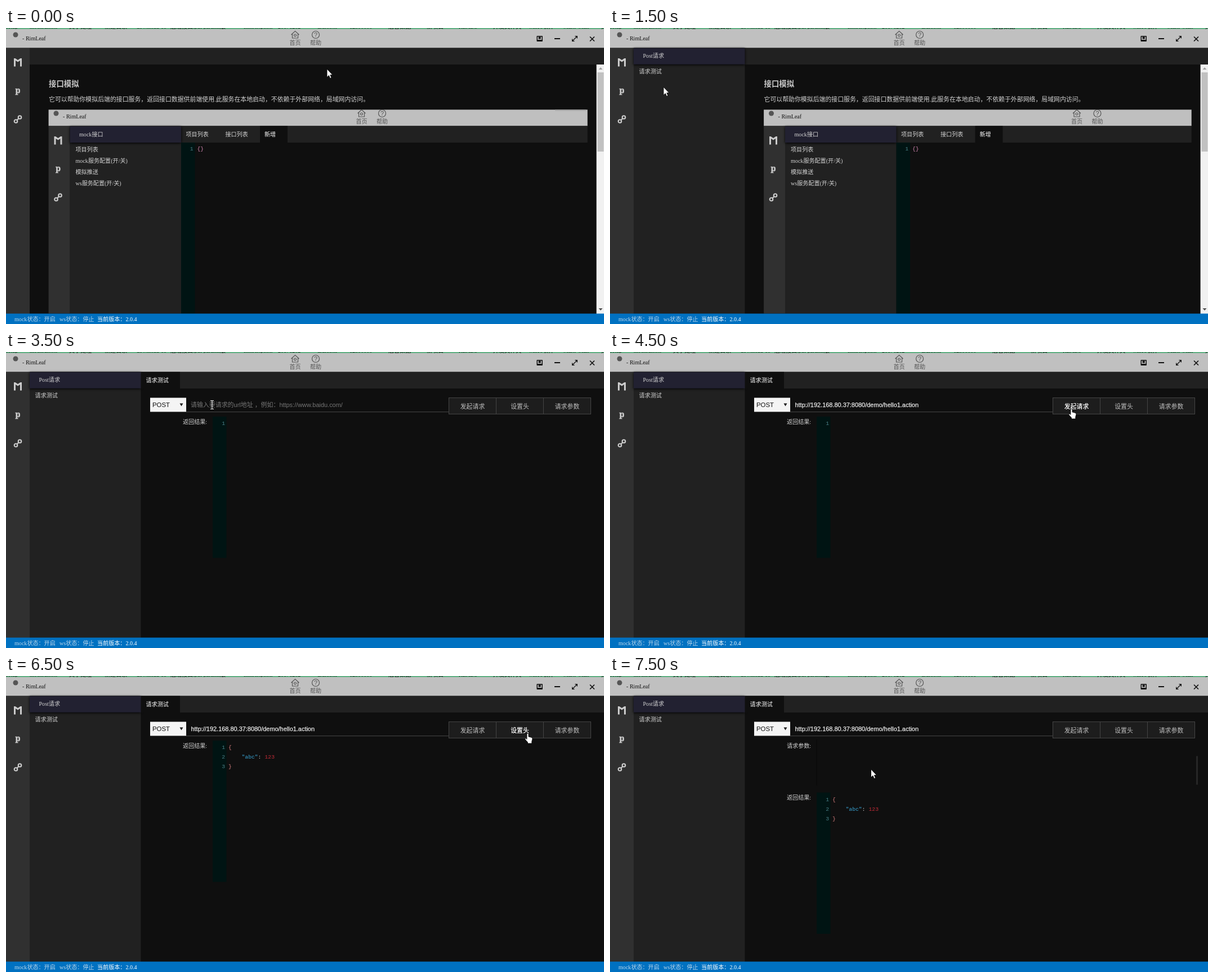
These frames come from a looping animation (1062 px wide and 527 px high, 8000 ms). An HTML page:

```html
<!DOCTYPE html>
<html lang="zh">
<head>
<meta charset="utf-8">
<title>接口请求演示</title>
<style>
  html, body { margin: 0; width: 100%; height: 100%; overflow: hidden; background: #0f0f0f; }
  svg { display: block; width: 100%; height: 100%; }
  text { font: 10.08px "Liberation Serif", "Noto Sans CJK SC", serif; fill: #d2d2d2; }
  .sans { font: 10.95px "Liberation Sans", "Noto Sans CJK SC", sans-serif; }
  .mono { font: 9.7px "Liberation Mono", monospace; }
  .para { font-size: 10.9px; }
  .title { font-size: 13.4px; font-weight: bold; fill: #c8c8c8; }
  .slab { font: 900 14px "Noto Serif", serif; fill: #ccc; stroke: #ccc; stroke-width: .5px; text-anchor: middle; }
  .dark, .desk { fill: #111; }
  .nav { fill: #555; }
  .num { fill: #4a8088; text-anchor: end; }
  .brace { fill: #d98080; }
  .key { fill: #38a5d6; }
  .val { fill: #c42c38; }
  .hint { fill: #757575; }
  .url { fill: #eee; stroke: #eee; stroke-width: .25px; }
  .btn { font-size: 10.9px; text-anchor: middle; fill: #c0c0c0; }
  .head { filter: drop-shadow(0 1px 2px #000); }
  .on { fill: #fff; }
</style>
</head>
<body>
<svg id="stage" viewBox="0 0 1062 527"></svg>
<script>
const rect = (x, y, w, h, fill, more = '') =>
  `<rect x="${x}" y="${y}" width="${w}" height="${h}" fill="${fill}" ${more}/>`;
const text = (x, y, s, cls = '', more = '') =>
  `<text x="${x}" y="${y}" class="${cls}" ${more}>${s}</text>`;
const line = (d, color, width = 1.2) =>
  `<path d="${d}" fill="none" stroke="${color}" stroke-width="${width}"/>`;
const group = (x, y, body, more = '') =>
  `<g transform="translate(${x} ${y})" ${more}>${body}</g>`;
const scene = (from, to, body) => `<g data-from="${from}" data-to="${to}">${body}</g>`;

const brand = '- RimLeaf';

const sideIcons = (x, y) => group(x, y,
  '<path d="M-7-7H-4.5L0-4L4.5-7H7V7.5H4V-3L0-.5L-4-3V7.5H-7Z" fill="#ccc"/>' +
  text(0, 55, 'p', 'slab') +
  line('M-2 103.5L2 99.5M-6.3 105a2.8 2.8 0 1 0 5.6 0a2.8 2.8 0 1 0-5.6 0M.7 98a2.8 2.8 0 1 0 5.6 0a2.8 2.8 0 1 0-5.6 0', '#ccc', 2.1));

const navIcons = (x, y) => group(x, y,
  line('M-7 0L0-6.5L7 0M-5-1.5V6H5V-1.5M-2 1a2 2 0 1 0 4 0a2 2 0 1 0-4 0', '#555') +
  text(0, 18, '首页', 'nav', 'text-anchor="middle"') +
  '<circle cx="36.5" r="6.5" fill="none" stroke="#555" stroke-width="1.2"/>' +
  text(36.5, 3.5, '?', 'sans nav', 'text-anchor="middle"') +
  text(36.5, 18, '帮助', 'nav', 'text-anchor="middle"'));

const logo = (x, y) => `<circle cx="${x}" cy="${y}" r="4.5" fill="#555"/>`;
const menuHead = (x, y, h, label) =>
  rect(x, y, 197.5, h, '#222131', 'class="head"') + text(x + 16.5, y + 17.5, label);

function desktopStrip() {
  const labels = [[0, 'setup'], [42, 'mockrun.txt'], [112, '文字处理'], [175, '新建目录'],
    [232, 'download-19'], [292, '后端接口.pdf params版'], [422, 'InitScript.txt'], [483, '20171202'],
    [553, 'draft.exe'], [610, '12300000'], [679, '后台数据'], [747, '新项目'], [804, 'READS'],
    [865, '开发文件夹'], [928, 'win10软件'], [990, 'Mark_Man'], [1057, '文']];
  return rect(0, 0, 1062, 3, '#62b184') + labels.map(([x, s]) => text(x, 1, s, 'desk')).join('');
}

function titleBar() {
  return rect(0, 2, 1062, 33.5, '#c0c0c0') + logo(17, 12) + text(29, 22, brand, 'dark') +
    navIcons(513.5, 12) +
    rect(942.5, 14, 10.5, 10, '#111', 'rx="1"') + rect(944, 15.5, 7.5, 5.5, '#c0c0c0') +
    rect(945.7, 15.5, 4, 4, '#111') +
    line('M974 19H984', '#111', 2) +
    line('M1006 23L1014 15M1010.5 14.7H1014.3V18.5M1005.7 19.5V23.3H1009.5', '#111', 1.3) +
    line('M1037 15.5L1045 23.5M1045 15.5L1037 23.5', '#111', 1.7);
}

function statusBar() {
  return rect(0, 508.5, 1062, 19, '#0071c1') +
    text(15, 522, 'mock状态：开启', '', 'style="fill:#bcd6ea"') +
    text(95, 522, 'ws状态：停止', '', 'style="fill:#bcd6ea"') +
    text(162, 522, '当前版本：2.0.4', 'on');
}

// Help page with its picture of the app; the picture is cut at the right margin.
function helpPage(shift) {
  const items = ['项目列表', 'mock服务配置(开/关)', '模拟推送', 'ws服务配置(开/关)'];
  const picture = rect(75.6, 145.4, 958, 364, '#0f0f0f') + rect(75.6, 145.4, 958, 29, '#bfbfbf') +
    rect(975, 145.4, 55, 2, '#a4a4a4') +
    logo(89, 152) + text(101, 161, brand, 'dark') + navIcons(631.5, 152) +
    rect(75.6, 174.4, 38, 334, '#303030') + sideIcons(92.5, 200) +
    rect(113.5, 174.4, 920, 29.6, '#212121') + rect(451, 174.4, 49, 30, '#0f0f0f') +
    rect(113.5, 204, 197.5, 305, '#212121') + menuHead(113.5, 175, 29, 'mock接口') +
    items.map((s, i) => text(123.5, 219.5 + i * 20.2, s)).join('') +
    text(319.5, 192.5, '项目列表') + text(389.5, 192.5, '接口列表') + text(459, 192.5, '新增', 'on') +
    rect(311, 204, 24.5, 305, '#001413') +
    text(332.5, 218, 1, 'mono num') + text(339.5, 218, '{}', 'mono', 'style="fill:#d68ab4"');
  return group(shift, 0, text(76, 104, '接口模拟', 'title') +
      text(76, 131, '它可以帮助你模拟后端的接口服务，返回接口数据供前端使用.此服务在本地启动，不依赖于外部网络，局域网内访问。', 'para')) +
    `<g clip-path="url(#margin)">${group(shift, 0, picture)}</g>` +
    rect(1048.6, 65, 14, 444, '#f1f1f1') + rect(1050.5, 79, 11, 141, '#c1c1c1') +
    '<path d="M1052.5 74h7l-3.5-4z" fill="#a3a3a3"/><path d="M1052.5 499h7l-3.5 4z" fill="#505050"/>';
}

function resultPanel(y, filled) {
  const body = rect(367, 115, 24.5, 251.5, '#001413') + text(314, 127.5, '返回结果:') +
    text(389, 130, 1, 'mono num');
  const json = text(389, 147, 2, 'mono num') + text(389, 164, 3, 'mono num') +
    text(395, 130, '{', 'mono brace') + text(418.5, 147, '"abc"', 'mono key') +
    text(447.6, 147, ':', 'mono') + text(459.5, 147, '123', 'mono val') + text(395, 164, '}', 'mono brace');
  return group(0, y, body + (filled ? json : ''));
}

function requestPage() {
  const buttons = [['发起请求', 4500, 6500], ['设置头', 6500, 7000], ['请求参数', 7000, 7500]];
  return rect(240, 35.5, 69, 30, '#0f0f0f') + text(248.5, 53.5, '请求测试', 'on') +
    rect(256, 81.5, 64, 25, '#f4f4f4') + text(260, 98, 'POST', 'sans dark', 'style="font-size:11.4px"') +
    '<path d="M308.5 91.5h6l-3 5z" fill="#111"/>' +
    rect(320, 106.2, 466, 1, '#484848') +
    scene(2000, 4000, text(328, 97.5, '请输入要请求的url地址 ，例如：https://www.baidu.com/', 'sans hint')) +
    scene(3000, 3500, rect(328, 86, 1, 16, '#ddd')) +
    scene(4000, 8000, text(328.5, 97.5, 'http://192.168.80.37:8080/demo/hello1.action', 'sans url')) +
    buttons.map(([s, from, to], i) =>
      rect(786.5 + i * 84, 81.5, 84, 29, '#1d1d1d', 'stroke="#444"') +
      text(828.5 + i * 84, 101, s, 'btn') +
      scene(from, to, text(828.5 + i * 84, 101, s, 'btn on'))).join('') +
    scene(2000, 5500, resultPanel(0, false)) + scene(5500, 7500, resultPanel(0, true)) +
    scene(7500, 8000, text(314, 127.5, '请求参数:') + rect(366.5, 113, 1, 82, '#090909') +
      rect(1041, 142.5, 3, 51, '#262626') + resultPanel(92.5, true));
}

const stage = document.getElementById('stage');
stage.innerHTML = '<clipPath id="margin"><path d="M0 145H1032.7V508.5H0z"/></clipPath>' +
  rect(0, 0, 1062, 527, '#0f0f0f') + desktopStrip() + titleBar() +
  rect(0, 35.5, 42, 474, '#303030') + rect(42, 35.5, 1020, 29.5, '#212121') + sideIcons(21, 61) +
  scene(0, 1500, helpPage(0)) + scene(1500, 2000, helpPage(197.5)) +
  scene(1500, 8000, rect(42, 35.5, 197.5, 474, '#212121') + menuHead(42, 35.7, 29, 'Post请求') +
    text(51.5, 80.5, '请求测试')) +
  scene(2000, 8000, requestPage()) +
  scene(2000, 2500, text(51.5, 80.5, '请求测试', 'on')) +
  statusBar() + '<path id="cursor" fill="#fff" stroke="#000" stroke-width=".8"/>';

const shapes = {
  arrow: 'M0 0V14.5L3.4 11.5L5.6 16.6L8 15.6L5.8 10.6H10Z',
  hand: 'M4 2Q5.5-.2 7 2V7L12 8.3Q14 9 14 11L12.8 15.5V19H5.5V17L1 12Q0 9.6 2.3 10L4 11.6Z',
  beam: 'M0 0H2.5L3 .5L3.5 0H6V1H3.5V15H6V16H0V15H2.5V1H0Z'
};
// One pointer pose per half second.
const poses = [
  ['arrow', 570, 73], ['arrow', 113, 96], ['hand', 18, 117], ['arrow', 95, 105],
  ['hand', 81, 79], ['beam', 348, 86], ['beam', 355, 86], ['beam', 363, 86],
  ['beam', 394, 86], ['hand', 814, 100], ['hand', 819, 100], ['hand', 820, 101],
  ['hand', 813, 104], ['hand', 921, 101], ['hand', 990, 101], ['arrow', 463.5, 166]
];

const scenes = [...document.querySelectorAll('[data-from]')];
const cursor = document.getElementById('cursor');

function draw(now) {
  const t = now % 8000;
  for (const s of scenes)
    s.style.display = t >= +s.dataset.from && t < +s.dataset.to ? '' : 'none';
  const [shape, x, y] = poses[Math.floor(t / 500)];
  cursor.setAttribute('d', shapes[shape]);
  cursor.setAttribute('stroke', shape === 'beam' ? 'none' : '#000');
  cursor.setAttribute('transform', `translate(${x} ${y})`);
  requestAnimationFrame(draw);
}
draw(performance.now());
</script>
</body>
</html>
```
